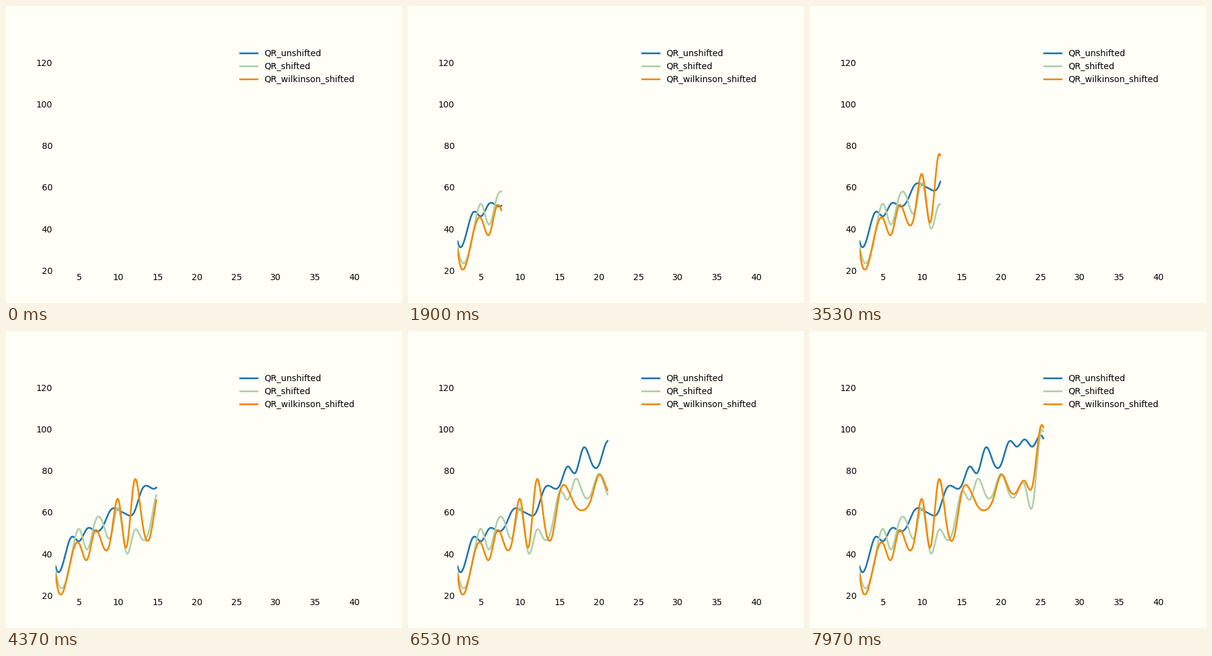
These frames come from a looping animation (640x480 px, 8000 ms). A matplotlib script:

```python
import numpy as np
import matplotlib.pyplot as plt
from matplotlib.animation import FuncAnimation

FRAMES = 240
LOOP_MS = 8000
PAPER = "#fffff8"

# Iterations per matrix size, starting at size 2.
SERIES = {
    "QR_unshifted": ("#2276ab", [
        34, 36, 48, 46, 52, 51, 53, 61, 61, 59, 60, 71, 72, 73,
        82, 79, 91, 84, 83, 94, 91.5, 95, 91.5, 97, 91, 95, 97]),
    "QR_shifted": ("#b0cfa8", [
        32, 24, 38, 52, 42, 55, 55, 48, 62, 40.5, 51, 47, 53, 70,
        66, 76, 68.5, 69, 78.5, 69, 69, 73, 63, 98, 86, 75, 80]),
    "QR_wilkinson_shifted": ("#f18a00", [
        30, 22, 38, 45, 37, 51, 44, 47, 66, 43, 75, 56, 48, 69.5,
        71, 63, 61, 66.5, 78, 71, 70, 75, 73, 101, 88, 75, 82]),
}


def spline(values, t):
    """Not-a-knot cubic spline through values at 0, 1, 2, ..."""
    y = np.asarray(values, float)
    n = len(y)
    a = np.zeros((n, n))
    b = np.zeros(n)
    for i in range(1, n - 1):
        a[i, i - 1:i + 2] = 1, 4, 1
        b[i] = 6 * (y[i - 1] - 2 * y[i] + y[i + 1])
    a[0, :3] = 1, -2, 1
    a[-1, -3:] = 1, -2, 1
    m = np.linalg.solve(a, b)
    k = np.clip(t.astype(int), 0, n - 2)
    u = t - k
    v = 1 - u
    return (v * y[k] + u * y[k + 1]
            + ((v**3 - v) * m[k] + (u**3 - u) * m[k + 1]) / 6)


fig, ax = plt.subplots(figsize=(6.4, 4.8), dpi=100, facecolor=PAPER)
ax.set_facecolor(PAPER)
ax.set_position([0.125, 0.11, 0.775, 0.77])
ax.set(xlim=(2, 41), ylim=(20, 130),
       xticks=range(5, 41, 5), yticks=range(20, 121, 20))
ax.tick_params(length=0)
for spine in ax.spines.values():
    spine.set_visible(False)

x = np.linspace(2, 41, 400)[:FRAMES]
curves = []
for name, (color, values) in SERIES.items():
    line, = ax.plot([], [], color=color, lw=2, label=name)
    curves.append((line, spline(values, x - 2)))
ax.legend(loc="upper right", frameon=False)


def draw(i):
    for line, y in curves:
        line.set_data(x[:i + 1], y[:i + 1])
    return [line for line, _ in curves]


anim = FuncAnimation(fig, draw, frames=FRAMES, interval=LOOP_MS / FRAMES,
                     init_func=lambda: draw(0), repeat=True, repeat_delay=0)
plt.show()
```
